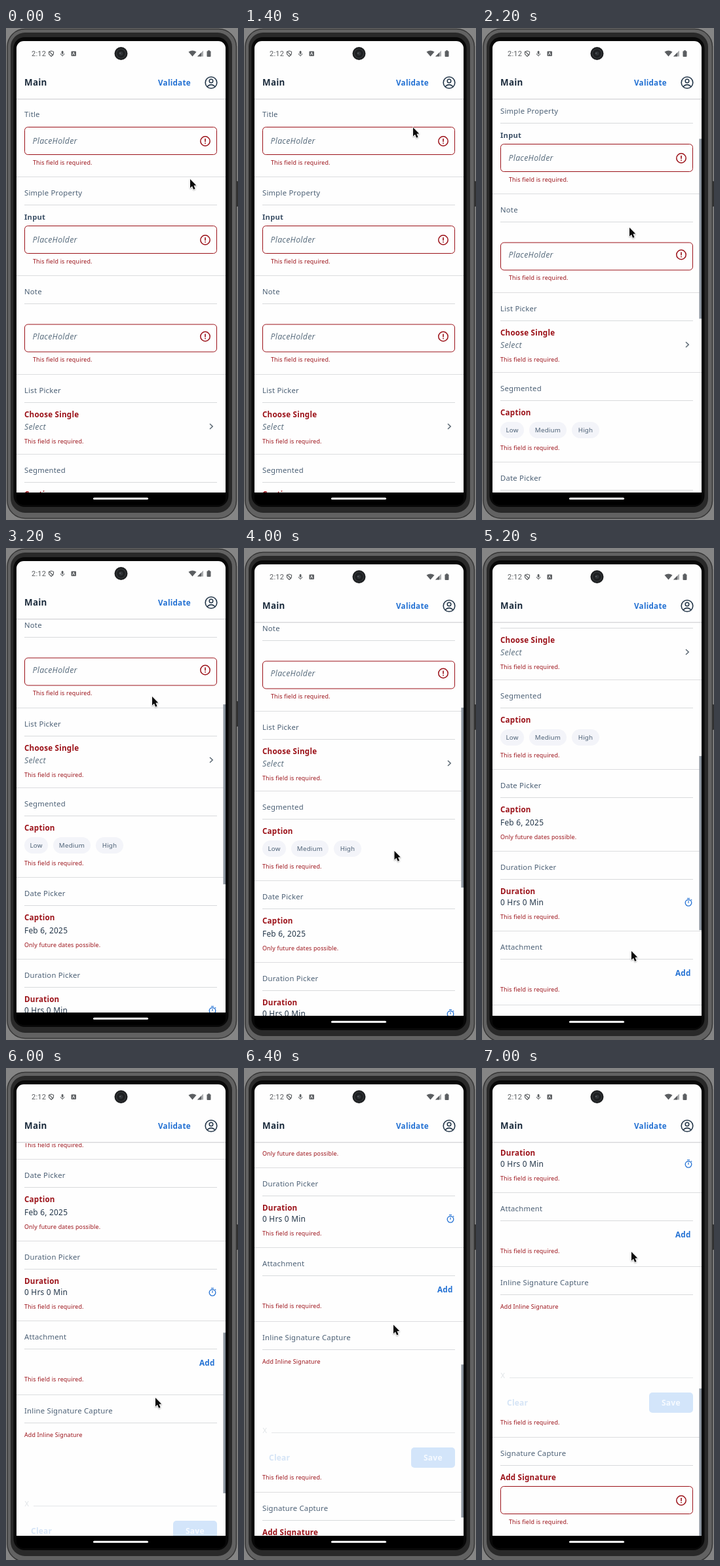
Recreate the animation shown at these times as an HTML page with a canvas. Size 354x752 px, loop 7.2 s.

```html
<!DOCTYPE html>
<html lang="en">
<head>
<meta charset="utf-8">
<title>Form validation</title>
<style>
html, body { margin: 0; width: 354px; height: 752px; overflow: hidden; background: #858585; }
canvas { display: block; width: 354px; height: 752px; }
</style>
</head>
<body>
<canvas id="stage"></canvas>
<script>
const canvas = document.getElementById('stage');
const ctx = canvas.getContext('2d');
const ratio = window.devicePixelRatio || 1;
canvas.width = 354 * ratio;
canvas.height = 752 * ratio;

const LOOP = 7200, STEP = 200;
const VIEW_TOP = 108, VIEW_BOTTOM = 710, MAX_SCROLL = 850, REACH_TIME = 400;
const RED = '#9b1118', SLATE = '#4d6176', DARK = '#223548', BLUE = '#2371d3', GRAY = '#5b5e61';
const SANS = '"Noto Sans", "Open Sans", sans-serif';

const styles = {
  heading: { size: 11.3, color: SLATE },
  label: { weight: 600, size: 11.6, color: RED },
  input: { weight: 600, size: 11.2, color: '#3d5167' },
  error: { size: 8.9, color: RED },
  hint: { weight: 'italic 400', size: 12.3, color: '#5f7282' },
  value: { size: 11.9, color: DARK },
  action: { weight: 600, size: 11.7, color: BLUE },
  clear: { weight: 600, size: 12, color: '#d5e4f6' },
  save: { weight: 600, size: 12, color: '#f6faff' },
  chip: { weight: 500, size: 9.8, color: SLATE },
  mark: { size: 11, color: '#dfe3e6' },
  title: { weight: 900, size: 13.4, color: '#1d2d3e' },
  clock: { size: 11, color: GRAY, family: 'Roboto, sans-serif' }
};

// Each drag ends with the pointer at x, y after pulling the page up.
const drags = [
  { start: 1800, end: 2200, x: 225, y: 305, pull: 125 },
  { start: 2800, end: 3200, x: 223, y: 227, pull: 160 },
  { start: 4200, end: 5000, x: 236, y: 529, pull: 170 },
  { start: 5400, end: 5800, x: 220, y: 504, pull: 199 },
  { start: 6000, end: 6800, x: 228, y: 281, pull: 223 }
];

const mix = (a, b, p) => a + (b - a) * p;
const progress = (time, start, end) => Math.min(1, Math.max(0, (time - start) / (end - start)));

function pose(time) {
  const hover = progress(time, 0, 1400);
  let x = mix(281, 258, hover), y = mix(231, 152, hover), scroll = 0;
  for (const drag of drags) {
    const reach = progress(time, drag.start - REACH_TIME, drag.start);
    const pulled = drag.pull * progress(time, drag.start, drag.end);
    x = mix(x, drag.x, reach);
    y = mix(y, drag.y + drag.pull, reach) - pulled;
    scroll += pulled;
  }
  return { x, y, scroll: Math.round(Math.min(scroll, MAX_SCROLL)) };
}

function paint(fill, stroke, width = 1) {
  if (fill) { ctx.fillStyle = fill; ctx.fill(); }
  if (stroke) { ctx.strokeStyle = stroke; ctx.lineWidth = width; ctx.stroke(); }
}

function rect(x, y, w, h, color) {
  ctx.fillStyle = color;
  ctx.fillRect(x, y, w, h);
}

function box(x, y, w, h, r, fill, stroke, width) {
  ctx.beginPath();
  ctx.roundRect(x, y, w, h, r);
  paint(fill, stroke, width);
}

function circle(x, y, r, fill, stroke, width) {
  ctx.beginPath();
  ctx.arc(x, y, r, 0, Math.PI * 2);
  paint(fill, stroke, width);
}

// SVG path drawn relative to x, y.
function shape(x, y, path, fill, stroke, width) {
  ctx.save();
  ctx.translate(x, y);
  const outline = new Path2D(path);
  if (fill) { ctx.fillStyle = fill; ctx.fill(outline); }
  if (stroke) { ctx.strokeStyle = stroke; ctx.lineWidth = width; ctx.stroke(outline); }
  ctx.restore();
}

// Text is centred on y by its capital height.
function text(str, x, y, style, align = 'left') {
  const { weight = 400, size, color, family = SANS } = styles[style];
  ctx.font = `${weight} ${size}px ${family}`;
  ctx.letterSpacing = `${size * 0.02}px`;
  ctx.textAlign = align;
  ctx.fillStyle = color;
  ctx.fillText(str, x, y + size * 0.357);
}

function required(y, x = 28, str = 'This field is required.') {
  text(str, x, y, 'error');
}

function field(y, hint, line = 21.5) {
  box(28.5, y, 293, 42, 5, null, RED, 1);
  text(hint, 40.5, y + line, 'hint');
  circle(304, y + line, 7.2, null, RED, 1.5);
  rect(303.2, y + line - 4, 1.6, 5, RED);
  rect(303.2, y + line + 2.3, 1.6, 1.6, RED);
  required(y + 54, 41);
}

function chips(y, names) {
  let x = 28;
  for (const name of names) {
    const width = 21 + name.length * 6 - (name.length > 4 ? 0 : 3);
    box(x, y - 12.5, width, 25, 12.5, '#f3f4f9');
    text(name, x + width / 2, y, 'chip', 'center');
    x += width + 8;
  }
}

function stopwatch(x, y) {
  circle(x, y + 0.8, 4.8, null, BLUE, 1.3);
  shape(x, y, 'M0 -2V1.3 M-2 -6H2 M4 -4.4L5.2 -3.2', null, BLUE, 1.2);
}

const sections = [
  { name: 'Title', height: 120, open: true, body: y => field(y + 44.5, 'PlaceHolder') },
  { name: 'Simple Property', height: 151, body(y) {
    text('Input', 28, y + 62, 'input');
    field(y + 75.5, 'PlaceHolder');
  } },
  { name: 'Note', height: 151, body: y => field(y + 75, 'PlaceHolder', 18.5) },
  { name: 'List Picker', height: 122, label: 'Choose Single', body(y) {
    text('Select', 28, y + 80.5, 'hint');
    shape(311, y + 80, 'M0 -4L4.2 0L0 4', null, '#5b6873', 1.5);
    required(y + 102.5);
  } },
  { name: 'Segmented', height: 137, label: 'Caption', body(y) {
    chips(y + 88.5, ['Low', 'Medium', 'High']);
    required(y + 115.5);
  } },
  { name: 'Date Picker', height: 125, label: 'Caption', body(y) {
    text('Feb 6, 2025', 28, y + 81.5, 'value');
    required(y + 103.5, 28, 'Only future dates possible.');
  } },
  { name: 'Duration Picker', height: 122, label: 'Duration', body(y) {
    text('0 Hrs 0 Min', 28, y + 79, 'value');
    stopwatch(315, y + 78.5);
    required(y + 100.5);
  } },
  { name: 'Attachment', height: 113, body(y) {
    text('Add', 295, y + 64.5, 'action');
    required(y + 90);
  } },
  { name: 'Inline Signature Capture', height: 261, body(y) {
    required(y + 61.5, 28, 'Add Inline Signature');
    text('X', 28.5, y + 167, 'mark');
    rect(42, y + 170, 280, 1, '#e4e6e8');
    text('Clear', 38, y + 209, 'clear');
    box(255, y + 193, 67, 31, 5, '#d3e5fa');
    text('Save', 274, y + 209, 'save');
    required(y + 238.5);
  } },
  { name: 'Signature Capture', height: 151, label: 'Add Signature', body: y => field(y + 75.5, '') }
];

function form() {
  let y = VIEW_TOP - 1;
  for (const { name, height, label, open, body } of sections) {
    text(name, 28, y + 25, 'heading');
    if (!open) rect(28, y + 43, 294, 1, '#d8dadc');
    if (label) text(label, 28, y + 62, 'label');
    body(y);
    y += height;
    rect(16, y, 319, 1, '#dcdddf');
  }
}

function phone() {
  box(350, 234, 4, 39, 1, '#303030');
  box(2, 1.5, 349.5, 748, 27, '#626262', '#363636', 1.5);
  box(7, 7, 338, 734, 22, '#292929');
  box(11.5, 14, 328, 718, 17, '#080808');
  box(16, 20, 319, 691, [11, 11, 0, 0], '#fefefe');
}

function statusBar() {
  text('2:12', 39, 39, 'clock');
  shape(69, 39, 'M0 -4L3.6 -2.7L3.4 1L0 4.5L-3.4 1L-3.6 -2.7Z M-3 -3L3 3', null, GRAY, 1.1);
  box(84.7, 35, 2.8, 5, 1.4, GRAY);
  shape(86.1, 39, 'M-2.8 0A2.8 2.8 0 0 0 2.8 0 M0 2.5V4.5', null, GRAY, 0.9);
  box(99.5, 35.5, 7.5, 7.5, 1, GRAY);
  shape(103.2, 41.5, 'M-1.7 0L0 -4.5L1.7 0', null, '#fff', 0.9);

  shape(284.5, 43.5, 'M0 0L-6 -7Q0 -11 6 -7Z', GRAY);
  shape(292, 43.5, 'M0 0L9 -9V0Z', '#a9abad');
  shape(292, 43.5, 'M0 0L6 -6V0Z', GRAY);
  box(306.5, 35.3, 6, 8.7, 1, GRAY);
  rect(308, 34.2, 3, 1.5, GRAY);

  circle(175.5, 39, 10, '#1d1f21');
  circle(175.5, 39, 7, null, '#36393c', 1.2);
  circle(175.5, 39, 3, '#303337');
  circle(174, 38.5, 0.8, '#777b80');
}

function header() {
  text('Main', 28, 83.5, 'title');
  text('Validate', 232, 83.5, 'action');
  circle(313, 83.5, 8.8, null, DARK, 1.6);
  circle(313, 81, 2.8, null, DARK, 1.5);
  shape(313, 89.5, 'M-6 0Q0 -5.7 6 0', null, DARK, 1.5);
  rect(16, VIEW_TOP, 319, 1, '#d5d6d8');
  rect(16, VIEW_TOP + 1, 319, 1, '#f1f1f2');
}

function scrollbar(scroll) {
  const top = 115 + scroll * 0.435;
  const length = 275 - Math.max(0, scroll - 370) * 0.104;
  rect(331.5, top, 3.5, length, '#8b949e');
}

function cursor(x, y) {
  const arrow = 'M0 0V13.5L3 10.7L5.2 15.8L7.6 14.8L5.5 9.8L9.3 9.6Z';
  ctx.save();
  ctx.lineJoin = 'round';
  ctx.shadowColor = 'rgba(0,0,0,.3)';
  ctx.shadowBlur = 2 * ratio;
  ctx.shadowOffsetY = ratio;
  shape(x, y, arrow, null, '#fff', 1.6);
  ctx.shadowColor = 'transparent';
  shape(x, y, arrow, '#0b0b0b');
  ctx.restore();
}

function draw(time) {
  const { x, y, scroll } = pose(time);
  ctx.setTransform(ratio, 0, 0, ratio, 0, 0);
  rect(0, 0, 354, 752, '#858585');

  ctx.save();
  ctx.translate(0, time < 4000 ? 0 : 5);
  phone();

  ctx.save();
  ctx.beginPath();
  ctx.rect(16, VIEW_TOP, 319, VIEW_BOTTOM - VIEW_TOP);
  ctx.clip();
  ctx.translate(0, -scroll);
  form();
  ctx.restore();

  if (scroll > 0) scrollbar(scroll);
  statusBar();
  header();
  box(16, VIEW_BOTTOM, 319, 19, [0, 0, 10, 10], '#000');
  box(133, 717.7, 84, 3, 1.5, '#fff');
  ctx.restore();

  cursor(x, y);
}

const begin = performance.now();
function tick() {
  const time = (performance.now() - begin) % LOOP;
  draw(Math.floor(time / STEP) * STEP);
  requestAnimationFrame(tick);
}
tick();
</script>
</body>
</html>
```
